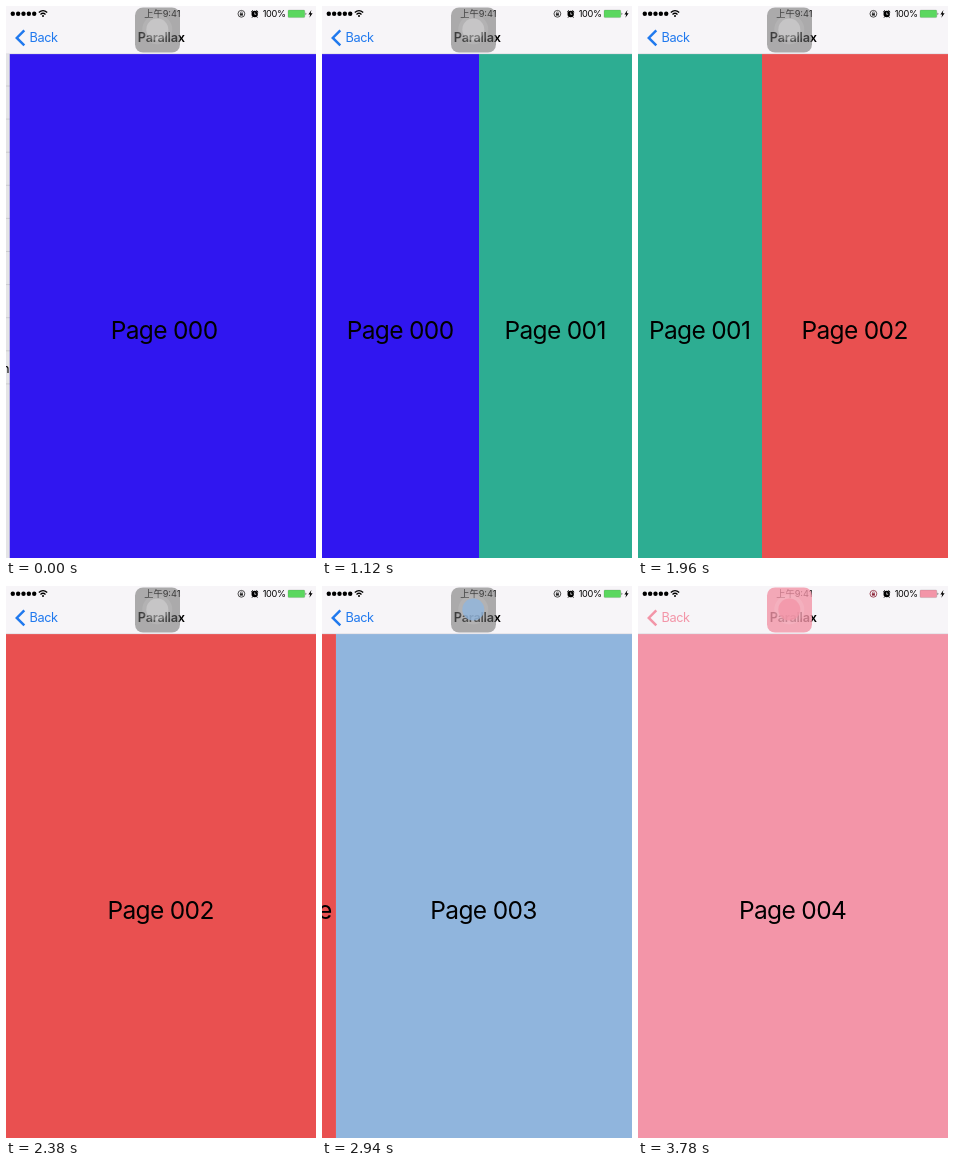
An HTML page for the animation above (4200 ms loop, 310 by 552 pixels).

```html
<!DOCTYPE html>
<html lang="en">
<head>
<meta charset="utf-8">
<title>Page swipe</title>
<style>
  html, body { margin: 0; width: 100%; height: 100%; overflow: hidden; background: #f7f5f8; }
  #stage {
    display: block; width: 100%; height: 100%;
    font-family: Inter, "Noto Sans", sans-serif;
  }
  .label { font-size: 24.5px; letter-spacing: -.65px; text-anchor: middle; }
  .bar { font-size: 12.75px; }
  .status { font-size: 9.2px; }
  .time { font-family: Inter, "Noto Sans CJK SC", "Noto Sans CJK", sans-serif; text-anchor: middle; }
  .title { font-weight: 600; text-anchor: middle; letter-spacing: -.25px; }
  .line { fill: none; stroke: #000; }
</style>
</head>
<body>
<svg id="stage" viewBox="0 0 310 552">
  <rect width="310" height="552" fill="#e4e4e6"/>
  <g id="rows" stroke="#c4c4c8" stroke-width=".8"></g>
  <text class="bar" x="-4" y="366.5">n</text>

  <g id="pages"></g>

  <rect width="310" height="48" fill="#f7f5f8"/>
  <path d="M0 47.7H310" stroke="#d8d6dc" stroke-width=".6"/>

  <path d="M18.3 24.4L10.8 31.9L18.3 39.4" class="line" style="stroke:var(--tint)" stroke-width="2.5"/>
  <text class="bar" x="23.5" y="36.2" letter-spacing="-.4" fill="var(--tint)">Back</text>
  <text class="bar title" x="155.3" y="36.2">Parallax</text>

  <g id="signal"></g>
  <g class="line" stroke-width="1.3">
    <path d="M32.8 6.6Q37 2.7 41.2 6.6"/>
    <path d="M34.5 8.4Q37 6.1 39.5 8.4"/>
  </g>
  <circle cx="37" cy="10" r="1"/>
  <text class="status time" x="156.4" y="11.2">上午9:41</text>

  <circle cx="235.4" cy="7.8" r="3.4" class="line" style="stroke:var(--lock)" stroke-width=".8"/>
  <rect x="233.9" y="7.3" width="3" height="2.3" fill="var(--lock)"/>
  <path d="M234.5 7.4V6.5Q235.4 5.2 236.3 6.5V7.4" class="line" style="stroke:var(--lock)" stroke-width=".6"/>
  <circle cx="248.7" cy="8" r="3.2"/>
  <path d="M245.2 6L247 4.4M252.2 6L250.4 4.4M246.7 10.6L246 11.6M250.7 10.6L251.4 11.6" class="line"/>
  <path d="M248.7 6.4V8.3H250.2" class="line" style="stroke:#f7f5f8" stroke-width=".7"/>
  <text class="status" x="256.7" y="11.2" letter-spacing="-.3">100%</text>
  <rect x="282" y="4" width="16.8" height="7.6" rx="1" fill="var(--charge)" stroke="#555" stroke-opacity=".35" stroke-width=".5"/>
  <path d="M299.7 6.5Q301 7.8 299.7 9.2Z"/>
  <path d="M305.4 4L302.4 8.4H304.2L303.4 11.8L306.6 7.2H304.7Z"/>

  <!-- Floating translucent button, above the bar text -->
  <rect x="129" y="1.5" width="45" height="45" rx="8" fill="var(--pad)"/>
  <circle cx="151.3" cy="23.5" r="15" fill="#fff" fill-opacity=".1"/>
  <circle cx="151.3" cy="23.5" r="11" fill="var(--dot)" fill-opacity="var(--dot-alpha)"/>
</svg>
<script>
const WIDTH = 310, TOP = 48, STEP = 140, LOOP = 4200;
const COLORS = ["#3016f0", "#2dad92", "#e95050", "#90b5dd", "#f395a8"];

// Each swipe: first step, release step, fraction dragged at release, last step
const SWIPES = [
  [3, 8, 0.4935, 11],
  [11, 14, 0.6, 17],
  [17, 20, 0.64, 22],
  [22, 25, 0.597, 27]
];

const stage = document.getElementById("stage");
const layer = document.getElementById("pages");

function add(parent, tag, attrs, text = "") {
  const el = document.createElementNS("http://www.w3.org/2000/svg", tag);
  for (const key in attrs) el.setAttribute(key, attrs[key]);
  el.textContent = text;
  return parent.appendChild(el);
}

for (let i = 0; i < 5; i++) {
  add(document.getElementById("signal"), "circle", { cx: 6.8 + 5.35 * i, cy: 7.7, r: 2.2 });
}
for (let y = 80; y < 400; y += 33.1) {
  add(document.getElementById("rows"), "path", { d: `M0 ${y}H310` });
}

const pages = COLORS.map((fill, i) => {
  const page = add(layer, "svg", { y: TOP, height: 504, overflow: "hidden" });
  add(page, "rect", { width: "100%", height: "100%", fill });
  add(page, "text", { class: "label", x: "50%", dx: -0.4, y: 285 }, "Page 00" + i);
  return page;
});

function swipeProgress(step, [start, release, part, end]) {
  if (step <= start) return 0;
  if (step >= end) return 1;
  if (step <= release) return part * ((step - start) / (release - start)) ** 1.6;
  const left = (end - step) / (end - release);
  return 1 - (1 - part) * left ** 3;
}

function setColors(step) {
  const pink = COLORS[4], done = step >= 27;
  const dot = step >= 24 ? pink : step >= 19 ? COLORS[3] : "#fff";
  const vars = {
    tint: done ? pink : "#2079ee",
    charge: done ? pink : "#5bd75f",
    pad: done ? "rgba(243, 149, 168, .8)" : "rgba(110, 110, 110, .55)",
    dot,
    "dot-alpha": dot === "#fff" ? 0.25 : 0.8,
    lock: step >= 24 ? "#8c2236" : "#222"
  };
  for (const name in vars) stage.style.setProperty("--" + name, vars[name]);
}

function draw(step) {
  const push = step < 2 ? 3.5 - 2.5 * step : 0;
  layer.setAttribute("transform", `translate(${push} 0)`);

  const position = SWIPES.reduce((sum, swipe) => sum + swipeProgress(step, swipe), 0);
  pages.forEach((page, i) => {
    // Labels stay centred in the visible slice of their page
    const x = (i - position) * WIDTH;
    const left = Math.max(0, x);
    const width = Math.min(WIDTH, x + WIDTH) - left;
    page.style.display = width > 0.01 ? "" : "none";
    page.setAttribute("x", left);
    page.setAttribute("width", Math.max(0, width));
  });
  setColors(step);
}

const origin = performance.now();
function tick() {
  draw(Math.floor(((performance.now() - origin) % LOOP) / STEP));
  requestAnimationFrame(tick);
}
tick();
</script>
</body>
</html>
```
